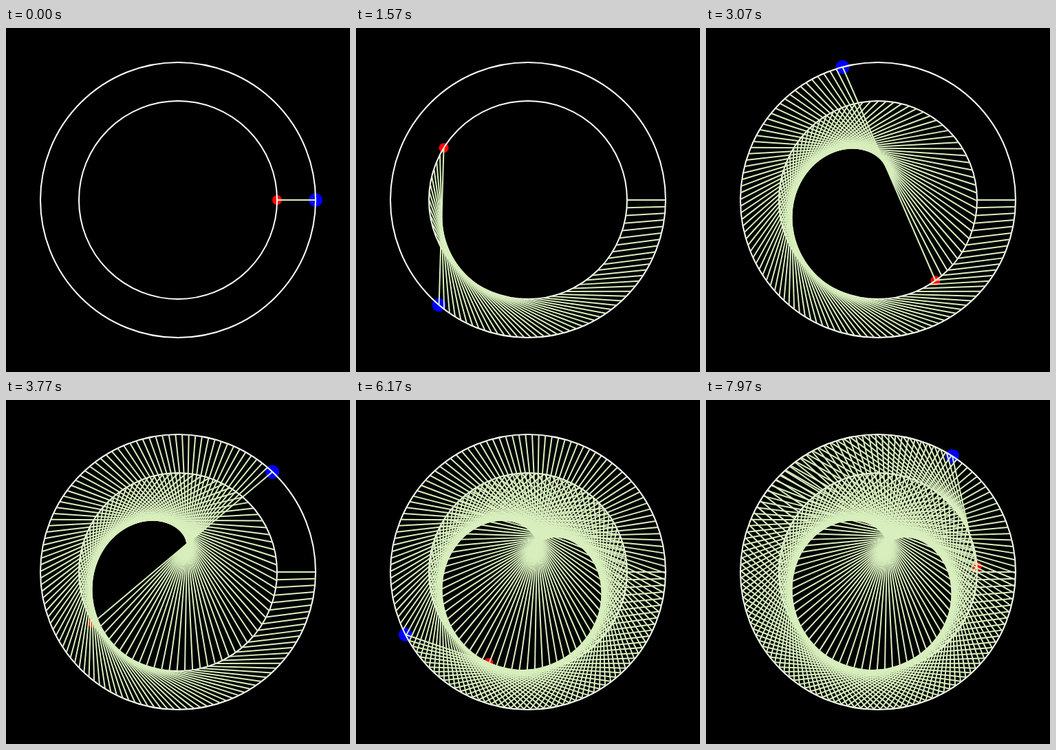
Write an HTML page with a canvas that moves like this. It is 500 px wide and 500 px high and loops after 8 s.

```html
<!DOCTYPE html>
<html lang="en">
<head>
<meta charset="utf-8">
<title>Orbit dance</title>
<style>
  html, body { margin: 0; width: 100%; height: 100%; overflow: hidden; background: #000; }
  canvas { display: block; width: 500px; height: 500px; }
</style>
</head>
<body>
<canvas id="stage" width="500" height="500"></canvas>
<script>
  const ctx = document.getElementById('stage').getContext('2d');
  const LOOP = 8000;
  const CENTER = 250;
  const TAU = Math.PI * 2;

  // speed: degrees per step, 30 steps per second
  const outer = { orbit: 200, speed: 2.7727, size: 10, color: '#0000ff' };
  const inner = { orbit: 144, speed: 4.5055, size: 7, color: '#ff0000' };
  const planets = [outer, inner];

  function position(planet, step) {
    const a = planet.speed * step * Math.PI / 180;
    return [CENTER + planet.orbit * Math.cos(a), CENTER + planet.orbit * Math.sin(a)];
  }

  function circle(x, y, r) {
    ctx.beginPath();
    ctx.arc(x, y, r, 0, TAU);
  }

  function draw(step) {
    ctx.fillStyle = '#000';
    ctx.fillRect(0, 0, 500, 500);
    ctx.lineWidth = 2;

    for (const p of planets) {
      circle(...position(p, step), p.size);
      ctx.fillStyle = p.color;
      ctx.fill();
    }

    ctx.strokeStyle = '#fff';
    for (const p of planets) {
      circle(CENTER, CENTER, p.orbit);
      ctx.stroke();
    }

    // One link between the planets stays behind for every step
    ctx.strokeStyle = '#d8eebd';
    for (let i = 0; i <= step; i++) {
      ctx.beginPath();
      ctx.moveTo(...position(inner, i));
      ctx.lineTo(...position(outer, i));
      ctx.stroke();
    }
  }

  // Steps fall on the nearest 10 ms to each thirtieth of a second
  function stepAt(ms) {
    return Math.floor((3 * Math.floor(ms / 10) + 1) / 10);
  }

  const start = performance.now();
  let shown = -1;

  function tick() {
    const step = stepAt((performance.now() - start) % LOOP);
    if (step !== shown) {
      draw(step);
      shown = step;
    }
    requestAnimationFrame(tick);
  }
  tick();
</script>
</body>
</html>
```
